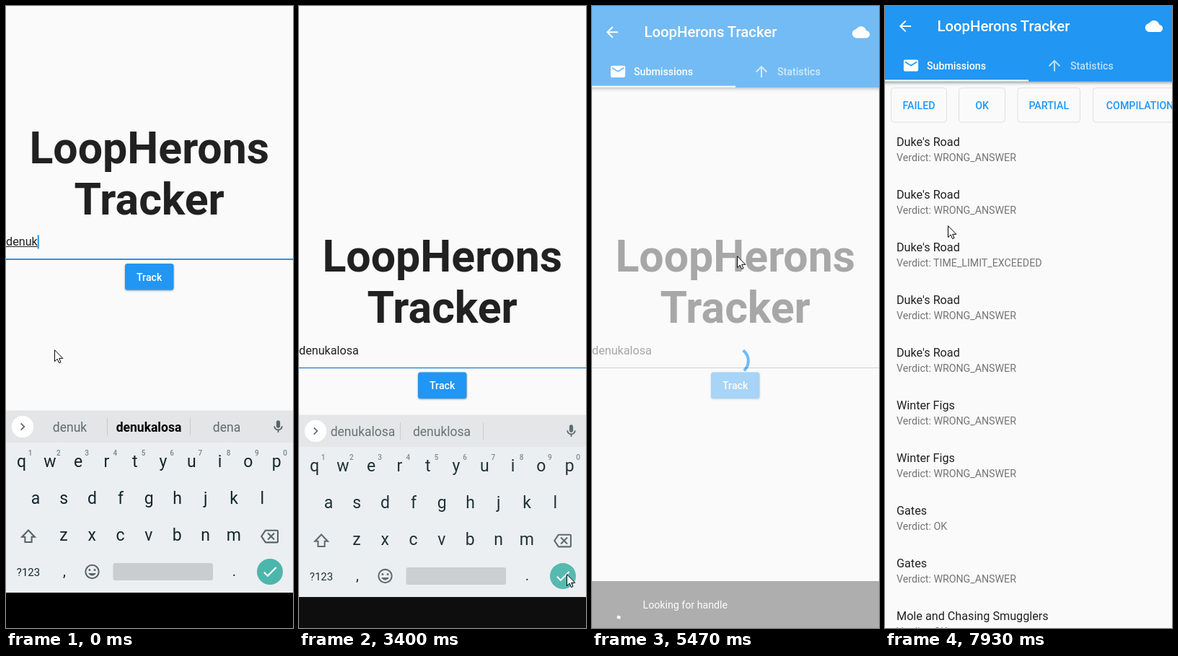
An HTML page that plays this animation: 398 by 862 pixels, repeating every 8000 ms.

```html
<!DOCTYPE html>
<html lang="en">
<head>
<meta charset="utf-8">
<title>Tracker</title>
<style>
html, body { margin: 0; width: 100%; height: 100%; overflow: hidden; background: #fafafa; }
svg { display: block; width: 398px; height: 862px; font-family: Roboto, sans-serif; }
.spin { fill: none; stroke-width: 4; stroke-linecap: square; }
</style>
</head>
<body>
<svg id="stage" viewBox="0 0 398 862" xmlns="http://www.w3.org/2000/svg"></svg>
<script>
const LOOP = 8000, STEP = 200 / 3, BLUE = '#2196f3';
const SITE = 'LoopHerons', USER = 'denukalosa', ALT = 'denuklosa';

const ICONS = {
  back: 'M20 11H7.83l5.59-5.59L12 4l-8 8 8 8 1.41-1.41L7.83 13H20v-2z',
  cloud: 'M19.35 10.04C18.67 6.59 15.64 4 12 4 9.11 4 6.6 5.64 5.35 8.04 2.34 8.36 0 10.91 0 14c0 3.31 2.69 6 6 6h13c2.76 0 5-2.24 5-5 0-2.64-2.05-4.78-4.65-4.96z',
  mail: 'M20 4H4c-1.1 0-2 .9-2 2v12c0 1.1.9 2 2 2h16c1.1 0 2-.9 2-2V6c0-1.1-.9-2-2-2zm0 4l-8 5-8-5V6l8 5 8-5v2z',
  up: 'M4 12l1.41 1.41L11 7.83V20h2V7.83l5.58 5.59L20 12l-8-8-8 8z',
  mic: 'M12 14c1.66 0 3-1.34 3-3V5c0-1.66-1.34-3-3-3S9 3.34 9 5v6c0 1.66 1.34 3 3 3zm5-3c0 2.76-2.24 5-5 5s-5-2.24-5-5H5c0 3.53 2.61 6.43 6 6.92V21h2v-3.08c3.39-.49 6-3.39 6-6.92h-2z',
  next: 'M10 6L8.59 7.41 13.17 12l-4.58 4.59L10 18l6-6z',
  check: 'M9 16.17L4.83 12l-1.42 1.41L9 19 21 7l-1.41-1.41z',
  erase: 'M22 3H7c-.69 0-1.23.35-1.59.88L0 12l5.41 8.11c.36.53.9.89 1.59.89h15c1.1 0 2-.9 2-2V5c0-1.1-.9-2-2-2zm0 16H7.07L2.4 12l4.66-7H22v14zm-11.59-2L14 13.41 17.59 17 19 15.59 15.41 12 19 8.41 17.59 7 14 10.59 10.41 7 9 8.41 12.59 12 9 15.59z',
  smile: 'M12 2a10 10 0 1 0 0 20 10 10 0 0 0 0-20zm0 18a8 8 0 1 1 0-16 8 8 0 0 1 0 16zm3.5-9a1.5 1.5 0 1 0 0-3 1.5 1.5 0 0 0 0 3zm-7 0a1.5 1.5 0 1 0 0-3 1.5 1.5 0 0 0 0 3zm3.5 6.5c2.33 0 4.31-1.46 5.11-3.5H6.89c.8 2.04 2.78 3.5 5.11 3.5z',
  shift: 'M12 3L2 13.5h5V20h10v-6.500h5zM12 5.8L17.600 11.700H15.200V18.200H8.800V11.700H6.400z'
};

const rect = (x, y, w, h, fill, extra = '') =>
  `<rect x="${x}" y="${y}" width="${w}" height="${h}" fill="${fill}" ${extra}/>`;
const text = (x, y, size, fill, str, extra = '') =>
  `<text x="${x}" y="${y}" font-size="${size}" fill="${fill}" ${extra}>${str}</text>`;
const mid = (x, y, size, fill, str, extra = '') =>
  text(x, y, size, fill, str, `text-anchor="middle" ${extra}`);
const icon = (name, cx, cy, fill, size = 24.3, extra = '') =>
  `<path d="${ICONS[name]}" fill="${fill}" fill-rule="evenodd" ${extra}
    transform="translate(${cx} ${cy}) scale(${size / 24}) translate(-12 -12)"/>`;
const spinner = (id, stroke) =>
  `<circle id="${id}" class="spin" r="18.3" pathLength="360" stroke="${stroke}"/>`;
const shadow = (y, blur, alpha) =>
  `style="filter:drop-shadow(0 ${y}px ${blur}px rgba(0,0,0,${alpha}))"`;
const medium = 'font-weight="500"', bold = 'font-weight="700"';

function home() {
  return `<g id="form">
    ${mid(198.7, 217.5, 60.8, '#212121', SITE, bold)}
    ${mid(198.7, 288.5, 60.8, '#212121', 'Tracker', bold)}
    ${text(0, 332, 16.2, '#212121', '', 'id="input"')}
    ${rect(0, 333, 0, 1, '#212121', 'id="compose"')}
    ${rect(0, 317.5, 2, 19, BLUE, 'id="caret"')}
    ${rect(0, 350, 398, 2, BLUE, 'id="line"')}
    ${rect(165, 357, 67.5, 36.5, BLUE, 'rx="3.500" ' + shadow(1.5, 1.3, .4))}
    ${mid(198.7, 380.5, 14.2, '#fff', 'Track', medium)}
  </g>
  <g id="snack">${rect(0, 797, 398, 66, '#323232')}
    <g transform="translate(42 829.500)">${spinner('snackSpin', '#fff')}</g>
    ${text(70.5, 834.5, 14.2, '#fff', 'Looking for handle')}
  </g>`;
}

function keyboard() {
  const ink = '#13262e', soft = '#566469', pitch = 39.3;
  const row = (keys, x, y) =>
    [...keys].map((k, i) => mid(x + i * pitch, y, 23, ink, k)).join('');
  const digits = [...'1234567890'].map((d, i) =>
    mid(33.5 + i * pitch, 622.5, 10, '#77858b', d, medium)).join('');
  const words = [88.5, 198, 306].map((x, i) =>
    mid(x, 590, 17.5, '#5f6b70', '', `id="word${i}"`)).join('');
  return `<g id="keys">
    ${rect(0, 560.5, 398, 45, '#e3e5e6')}${rect(0, 605, 398, 208, '#eceff1')}
    ${rect(0, 813, 398, 60, '#000')}
    <circle cx="23" cy="583" r="15.500" fill="#fff" ${shadow(.5, .6, .2)}/>
    ${icon('next', 23, 583, '#5a676d', 21)}
    ${words}${rect(140, 571, 1, 24, '#c6cacc')}${rect(255, 571, 1, 24, '#c6cacc')}
    ${icon('mic', 377.5, 583, soft, 21)}
    ${row('qwertyuiop', 21.5, 639)}${digits}
    ${row('asdfghjkl', 41, 690)}${row('zxcvbnm', 80, 741)}
    ${icon('shift', 31, 735, soft, 27)}${icon('erase', 365.5, 735, soft, 25)}
    ${mid(31, 789.5, 15, ink, '?123')}${mid(81, 790, 20, ink, ',')}
    ${icon('smile', 119.5, 784, soft, 24.5)}
    ${rect(148.5, 772, 138.5, 24, '#c9cdcf', 'rx="3"')}${mid(316.5, 790, 20, ink, '.')}
    <circle cx="366" cy="784" r="18" fill="#4db6ac"/>${icon('check', 366, 784, '#fff', 25)}
  </g>`;
}

function results() {
  const WA = 'WRONG_ANSWER';
  const rows = [["Duke's Road", WA], ["Duke's Road", WA], ["Duke's Road", 'TIME_LIMIT_EXCEEDED'],
    ["Duke's Road", WA], ["Duke's Road", WA], ['Winter Figs', WA], ['Winter Figs', WA],
    ['Gates', 'OK'], ['Gates', WA], ['Mole and Chasing Smugglers', 'OK']];
  const chips = [[8, 78, 'FAILED'], [102, 65, 'OK'], [183.5, 87.5, 'PARTIAL'], [288, 182, 'COMPILATION_ERROR']];
  return `<g id="page">
    ${rect(0, 0, 398, 1100, '#fafafa')}
    <g transform="translate(198.500 483.500)" id="wait">${spinner('pageSpin', BLUE)}</g>
    <g id="list">
      ${chips.map(([x, w, label]) =>
        rect(x + .5, 113.5, w - 1, 47.5, 'none', 'rx="4" stroke="#e0e0e0"') +
        mid(x + w / 2, 142.5, 14.2, BLUE, label, medium)).join('')}
      ${rows.map(([name, verdict], i) =>
        text(16, 194 + 73 * i, 16.2, '#212121', name) +
        text(16, 214.5 + 73 * i, 14.2, '#757575', 'Verdict: ' + verdict)).join('')}
    </g>
    ${rect(-10, -10, 418, 114.5, BLUE, shadow(2, 2.2, .38))}
    ${icon('back', 28, 28, '#fff')}
    ${text(72.5, 35, 20.3, '#fff', SITE + ' Tracker', medium)}
    ${icon('cloud', 373, 28, '#fff')}
    ${icon('mail', 36, 82.5, '#fff')}${text(58, 87.5, 14.2, '#fff', 'Submissions', medium)}
    <g opacity=".7">${icon('up', 235, 82.5, '#fff')}${text(257, 87.5, 14.2, '#fff', 'Statistics', medium)}</g>
    ${rect(0, 102.3, 199, 2.2, '#fff')}
  </g>`;
}

const pointer = `<path id="mouse" d="M.5 .7V16.600L4.200 13.100 6.600 18.600 9 17.600 6.700 12.300H11.800Z"
  fill="#fff" stroke="#000" stroke-width="1"/>`;

document.getElementById('stage').innerHTML = home() + keyboard() + results() + pointer;

const $ = id => document.getElementById(id);
const set = (id, attrs) => { for (const k in attrs) $(id).setAttribute(k, attrs[k]); };
const show = (id, on) => set(id, { display: on ? 'inline' : 'none' });
const clamp = v => Math.min(1, Math.max(0, v));
const move = (id, x, y) => set(id, { transform: `translate(${x} ${y})` });

// cubic-bezier(.4, 0, .2, 1)
function ease(x) {
  let lo = 0, hi = 1, s;
  for (let i = 0; i < 20; i++) {
    s = (lo + hi) / 2;
    const bx = 1.2 * (1 - s) ** 2 * s + .6 * (1 - s) * s * s + s ** 3;
    if (bx < x) lo = s; else hi = s;
  }
  return 3 * (1 - s) * s * s + s ** 3;
}

function spin(id, ms) {
  const p = Math.max(0, ms) / 1333 % 1;
  const head = ease(clamp(p * 2)), tail = ease(clamp(p * 2 - 1));
  const start = -90 + tail * 270 + ms / 2222 * 360 + p * 90;
  set(id, {
    transform: `rotate(${start})`,
    'stroke-dasharray': `${Math.max(.1, (head - tail) * 270)} 720`
  });
}

const PATH = [[0, 67, 476], [2400, 67, 476], [3000, 375, 786], [3130, 371, 787], [3400, 371, 787],
  [3733, 186, 615], [4067, 199, 532], [5067, 199, 532], [5600, 201, 312], [5733, 201, 312],
  [6067, 200, 346], [6600, 200, 346], [7467, 199, 704], [7930, 87, 304], [LOOP, 87, 304]];

function mouseAt(t) {
  const i = PATH.findIndex(k => k[0] > t);
  const [t0, x0, y0] = PATH[i - 1], [t1, x1, y1] = PATH[i];
  let p = (t - t0) / (t1 - t0);
  p = p * p * (3 - 2 * p);
  return [x0 + (x1 - x0) * p, y0 + (y1 - y0) * p];
}

function typing(t) {
  const n = 5 + [660, 790, 1120, 1460, 1590].filter(k => t >= k).length;
  const done = n === USER.length;
  const typed = USER.slice(0, n);
  $('input').textContent = typed;
  $('word0').textContent = typed;
  $('word1').textContent = done ? ALT : USER;
  set('word1', { 'font-weight': done ? 400 : 700, fill: done ? '#5f6b70' : '#000' });
  $('word2').textContent = done ? '' : n === 5 ? 'dena' : ALT;
  const width = $('input').getComputedTextLength();
  set('compose', { width });
  set('caret', { x: width });
}

function draw(t) {
  typing(t);
  const focus = t < 3330;
  const off = (t >= 530 && t < 660) || (t >= 2130 && t < 2630) || t >= 3130;
  show('caret', !off);
  show('compose', focus);
  move('form', 0, focus ? 0 : 150.5);

  const blur = clamp((t - 3330) / 200);
  const mix = (a, b) => Math.round(a + (b - a) * blur);
  set('line', {
    fill: `rgb(${mix(33, 140)},${mix(150, 140)},${mix(243, 140)})`,
    y: 350 + blur * .5, height: 2 - blur
  });

  const hide = clamp((t - 3330) / 180);
  show('keys', hide < 1);
  move('keys', 0, 40 * hide ** 2);
  set('keys', { opacity: 1 - hide ** 3 });

  show('snack', t > 4217);
  move('snack', 0, 66 * (1 - ease(clamp((t - 4217) / 250))));
  spin('snackSpin', t - 4217);

  const enter = clamp((t - 5240) / 300);
  show('page', enter > 0);
  move('page', 0, 215 * (1 - ease(enter)));
  set('page', { opacity: enter ** 1.7 });
  spin('pageSpin', Math.min(t, 6067) - 5277);
  show('wait', t < 6660);
  show('list', t >= 6660);

  move('mouse', ...mouseAt(t).map(Math.round));
}

function frame() {
  const t = performance.now() % LOOP;
  draw(Math.floor((t + 4) / STEP) * STEP % LOOP);
  requestAnimationFrame(frame);
}
frame();
</script>
</body>
</html>
```
